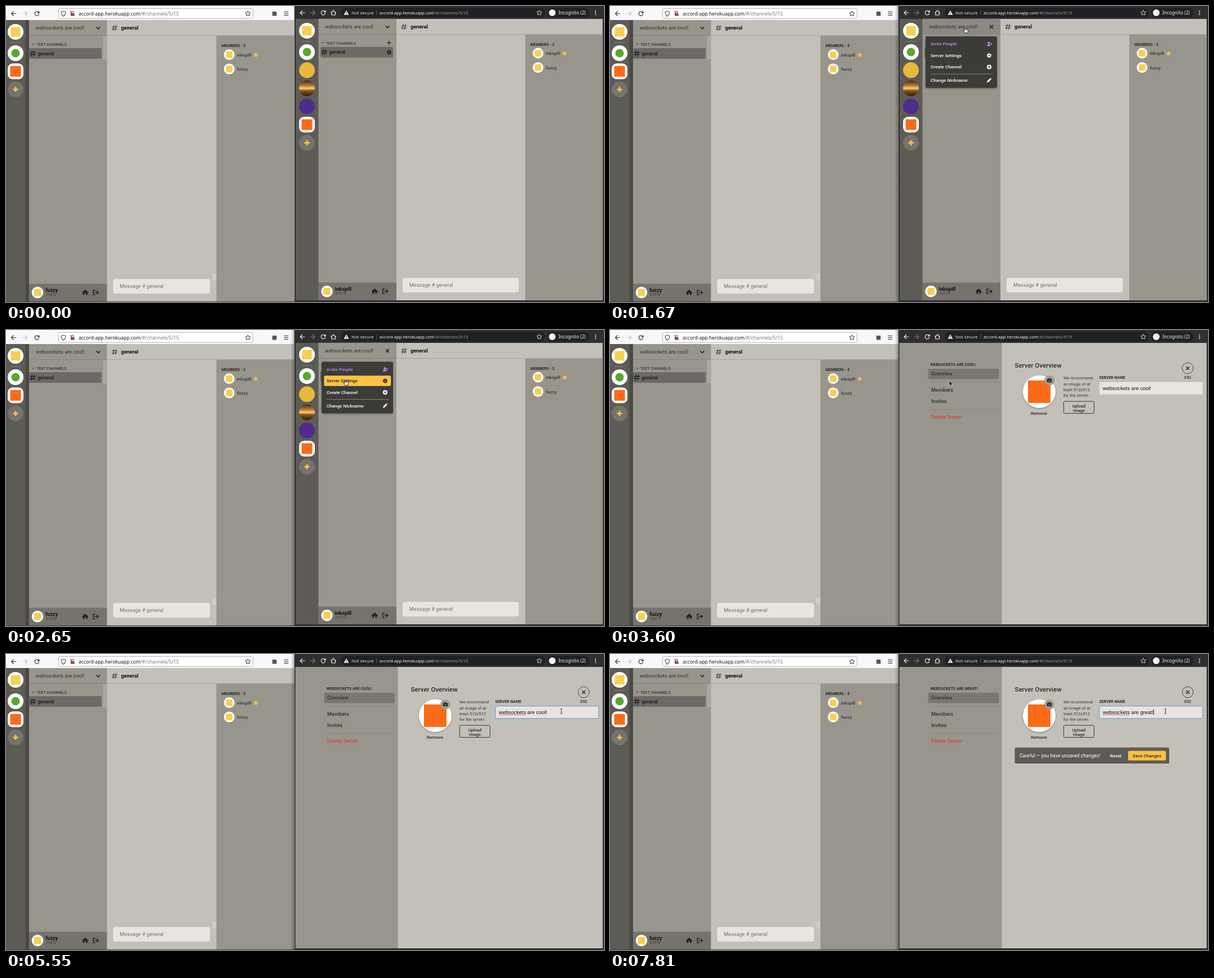
Recreate the animation shown at these times as an HTML page. Size 1063 px wide and 527 px high, loop 8000 ms.

```html
<!DOCTYPE html>
<html lang="en">
<head>
<meta charset="utf-8">
<title>Server settings demo</title>
<style>
  html, body { margin: 0; width: 100%; height: 100%; overflow: hidden; background: #2f2f2e; }
  svg { display: block; width: 1063px; height: 527px; }
  text { font-family: Roboto, sans-serif; white-space: pre; }
  .sys { font-family: "Noto Sans", sans-serif; }
  .field { font-family: "Liberation Sans", Arial, sans-serif; }
</style>
</head>
<body>
<svg id="stage" viewBox="0 0 1063 527" xmlns="http://www.w3.org/2000/svg"></svg>
<script>
const LOOP = 8000;
const C = {
  rail: '#5d5b56', side: '#98958d', main: '#c3c0ba', bar: '#76736d', field: '#e8e5e0',
  ink: '#2b2a28', gold: '#fdc144', orange: '#fb6a17', logo: '#f5cf52', menu: '#3b3a37'
};

const rect = (x, y, w, h, fill, r = 0, more = '') =>
  `<rect x="${x}" y="${y}" width="${w}" height="${h}" rx="${r}" fill="${fill}" ${more}/>`;
const disc = (x, y, r, fill, more = '') => `<circle cx="${x}" cy="${y}" r="${r}" fill="${fill}" ${more}/>`;
const text = (x, y, size, str, { fill = C.ink, w = 400, id = '', cls = '', mid = false } = {}) =>
  `<text x="${x}" y="${y}" font-size="${size}" font-weight="${w}" fill="${fill}" id="${id}" class="${cls}"` +
  `${mid ? ' text-anchor="middle"' : ''}>${str}</text>`;
const line = (x, y, d, color, w = 1.2, more = '') =>
  `<path transform="translate(${x} ${y})" d="${d}" fill="none" stroke="${color}" stroke-width="${w}" ${more}/>`;
const shape = (x, y, d, fill, more = '') => `<path transform="translate(${x} ${y})" d="${d}" fill="${fill}" ${more}/>`;
const group = (id, inner, more = '') => `<g id="${id}" ${more}>${inner}</g>`;

const STAR = 'M0-4.6L1.4-1.6 4.6-1.3 2.2.9 2.9 4.1 0 2.4-2.9 4.1-2.2.9-4.6-1.3-1.4-1.6Z';
const PLUS = 'M-4.5 0H4.5M0-4.5V4.5';
const CROSS = 'M-3-3L3 3M3-3L-3 3';
const HASH = 'M-1.2-5L-2.8 5M2.8-5L1.2 5M-4.5-1.8H5M-5 1.8H4.5';
const BACK = 'M4.3 0H-4M0-4L-4 0 0 4';
const AHEAD = 'M-4.3 0H4M0-4L4 0 0 4';
const RELOAD = 'M3.4-1.7A3.8 3.8 0 1 0 3.7 1M3.9-4V-1.2H1';
const HOME = 'M0-5L6 .3 5.2 1.2 4 .2V4.5H1.2V1.3H-1.2V4.5H-4V.2L-5.2 1.2-6 .3Z';
const EXIT = 'M-1-4H-4.5V4H-1M-2 0H4.5M1.6-3L4.6 0 1.6 3';

const gear = (x, y, fill) =>
  disc(x, y, 2.2, 'none', `stroke="${fill}" stroke-width="1.9"`) +
  disc(x, y, 3.5, 'none', `stroke="${fill}" stroke-width="1.3" stroke-dasharray="1.5 1.25"`);

const logoDisc = (x, y, r) => disc(x, y, r, '#fffefa') + rect(x - r * .6, y - r * .6, r * 1.2, r * 1.2, C.logo);

function rail(x, y, full) {
  const step = 32.3;
  let at = y + 38;
  let out = logoDisc(x, y, 14) + rect(x - 9, y + 18.5, 18, 1, '#85827c') +
    disc(x, at, 14, '#fff') + disc(x, at, 7.5, '#58a82c');
  if (full) {
    out += disc(x, at += step, 14, '#e9b93c') +
      disc(x, at += step, 14, 'url(#dusk)') +
      disc(x, at += step, 14, '#4d2c8c');
  }
  at += step;
  out += rect(x - 14, at - 14, 28, 28, '#fff', 9) + rect(x - 9.5, at - 9.5, 19, 19, C.orange);
  at += step;
  return out + disc(x, at, 14, C.bar) + line(x, at, PLUS, C.gold, 2.8);
}

// Parts both chat windows share; (x, y) is the sidebar's top left corner.
function sidebar(x, y, w, bottom, user, tag) {
  const base = bottom - 16;
  return rect(x, y, w, bottom - y, C.side) +
    rect(x, y + 27, w, 1, '#85827b') +
    line(x + 7.5, y + 43, 'M-2.4-1.2L0 1.2 2.4-1.2', C.ink, .9) +
    text(x + 13, y + 46, 6.9, 'TEXT CHANNELS', { w: 500, fill: '#3b3a37' }) +
    rect(x, bottom - 31.5, w, 31.5, C.bar) +
    logoDisc(x + 15, base, 10.3) +
    text(x + 29, base - 1, 9.2, user, { w: 700, fill: '#111' }) +
    text(x + 29.5, base + 6, 6.9, tag, { fill: '#4a4844' }) +
    shape(x + 99.8, base, HOME, '#222') +
    line(x + 118.8, base, EXIT, '#222', 1.5);
}

function channel(x, y) {
  return rect(x, y, 129, 19, '#6c6a66', 2) +
    line(x + 6.5, y + 9.5, HASH, '#1c1c1b', 1.2, 'transform-origin="0 0" stroke-linecap="round"') +
    text(x + 15.3, y + 12.7, 8.7, 'general', { w: 500, fill: '#1c1c1b' });
}

function chat(x, y, split, right, bottom) {
  return rect(x, y, right - x, bottom - y, C.main) +
    rect(split, y + 27, right - split, bottom - y - 27, C.side) +
    rect(x, y + 27, right - x, 1, '#a8a59f') +
    line(x + 13.5, y + 14, HASH, '#4c4a47', 1.3) +
    text(x + 25, y + 17, 9.2, 'general', { w: 700, fill: '#111' }) +
    rect(x + 11, bottom - 40, split - x - 22.5, 26, C.field, 4) +
    text(x + 22.8, bottom - 23.8, 9.2, 'Message # general', { fill: '#76746f' });
}

function members(x, y) {
  const row = (dy, name) => logoDisc(x + 13.8, y + dy, 9.5) +
    text(x + 27.5, y + dy + 3, 8.05, name, { w: 500, fill: '#3a3936' });
  return text(x, y, 6.9, 'MEMBERS - 2', { w: 700 }) +
    row(13.6, 'inkspill') + row(39, 'fuzzy') + shape(x + 61, y + 13.8, STAR, C.gold);
}

const address = (x, y, size, host, path) =>
  text(x, y, size, `accord-app.herokuapp.com<tspan fill="${path}">/#/channels/5/15</tspan>`, { fill: host, cls: 'sys' });

const leftWindow =
  rect(0, 0, 512.5, 526, '#f8f8fa') +
  line(13.5, 13.5, BACK, '#333') + line(34, 13.5, AHEAD, '#c2c2c6') + line(55, 13.5, RELOAD, '#333') +
  rect(93.5, 4.5, 345.5, 17.5, '#fff', 2.5, 'stroke="#b4b4b8" stroke-width="1"') +
  line(102, 13.5, 'M0-4.5L3.8-3.2C3.8 1.2 2.5 3.5 0 4.8C-2.5 3.5-3.8 1.2-3.8-3.2Z', '#444', 1.1) +
  rect(115, 12.8, 6.4, 4.8, '#55555a', 1) + line(118.2, 12.8, 'M-2 0V-1.5A2 2 0 0 1 2-1.5V0', '#55555a', 1.1) +
  line(118.2, 13.6, 'M-4.2-4.2L4.2 4.2', '#e02950', 1.1) +
  address(129, 16.7, 8.5, '#15141a', '#77777c') +
  line(430, 13.5, STAR, '#333', 1) +
  rect(473.5, 10, 7.5, 7.5, '#55555a') +
  line(498, 13.5, 'M-4-3H4M-4 0H4M-4 3H4', '#333', 1) +
  rect(0, 25, 35, 501, C.rail) + rect(34.7, 25, 6.8, 501, '#4b4945') +
  rail(17, 46, false) +
  sidebar(41, 25, 139, 526, 'fuzzy', '#3852') +
  text(53, 42.2, 9.2, 'websockets are cool!', { fill: '#33322f' }) +
  line(164, 39, 'M-3.5-1.8L0 1.8 3.5-1.8', '#222', 1.6) +
  channel(41, 75) +
  rect(172.5, 53, 7, 42, '#aaa7a0') +
  chat(179.5, 25, 374, 512.5, 526) +
  rect(366.5, 477, 7.5, 12, '#d0cdc8') +
  members(383, 73) +
  rect(0, 526, 513, 1, '#3a3a39');

const toolbar =
  rect(513, 0, 550, 527, '#2f2f30') +
  rect(595, 3, 363, 17.5, '#202124', 8.7) +
  line(527, 12, BACK, '#eee') + line(545, 12, AHEAD, '#77787b') + line(564, 12, RELOAD, '#eee') +
  line(582, 12, 'M-4.5.2L0-4 4.5.2M-3.2-.8V4H3.2V-.8', '#eee') +
  shape(605, 12, 'M0-4.2L4.6 3.8H-4.6Z', '#eee') + rect(604.6, 10.6, .9, 2.6, '#202124') + rect(604.6, 13.8, .9, .9, '#202124') +
  text(614, 14.8, 7.8, 'Not secure', { fill: '#e0e0e2', cls: 'sys' }) +
  rect(658.7, 7, .8, 10, '#66676a') +
  address(664, 14.8, 7.52, '#f2f2f3', '#9a9b9e') +
  line(948, 12, STAR, '#ddd', .9) +
  rect(962, 3, 75, 17.5, '#202124', 8.7) + disc(971, 12, 6, '#f0f0f1') +
  text(982, 15, 8.2, 'Incognito (2)', { fill: '#f0f0f1', cls: 'sys' }) +
  [-3.2, 0, 3.2].map(d => disc(1048, 12 + d, 1, '#eee')).join('');

const rightChat =
  rect(515, 23, 41, 501, C.rail) + rail(535, 44, true) +
  sidebar(555.5, 22.7, 139, 524, 'inkspill', '#2516') +
  rect(555.5, 23, 138.5, 26.7, '#8c8982', 0, 'id="headHover"') +
  text(567, 40, 9.2, 'websockets are cool!', { fill: '#33322f' }) +
  line(678, 37, 'M-3.5-1.8L0 1.8 3.5-1.8', '#222', 1.6, 'id="chevron"') +
  line(678, 37, CROSS, '#222', 1.6, 'id="cross"') +
  line(681, 65.5, 'M-3.5 0H3.5M0-3.5V3.5', '#333', 1.7) +
  channel(559, 72.7) + gear(681, 82.5, '#222') +
  chat(694, 23, 923, 1060.5, 524) + members(932, 70.5);

const ROWS = [
  [70, 'Invite People', '#b58df2', (y, f) => disc(673.3, y - 1.8, 2, f) +
    shape(673.3, y, 'M-3.6 3.6C-3.6-.5 3.6-.5 3.6 3.6Z', f) + line(677.5, y - .5, 'M-1.8 0H1.8M0-1.8V1.8', f, 1)],
  [90.5, 'Server Settings', '#fff', (y, f) => gear(674, y, f)],
  [111, 'Create Channel', '#fff', (y, f) => disc(674, y, 4, f) +
    line(674, y, 'M-2.2 0H2.2M0-2.2V2.2', f === '#fff' ? C.menu : C.gold, 1.1)],
  [134.6, 'Change Nickname', '#fff', (y, f) => shape(674, y, 'M-4 4L-3.3 1.3 1.4-3.4 3.4-1.4-1.3 3.3ZM2-4L2.7-4.5 4.5-2.7 4-2Z', f)]
];
const row = ([y, label, color, icon], on) => {
  const f = on ? '#222' : color;
  return (on ? rect(565.3, y - 9.3, 119, 18.6, C.gold, 2) : '') +
    text(570, y + 2.9, 8.05, label, { w: 500, fill: f }) + icon(y, f);
};
const menu = rect(561, 56.5, 127, 91.7, C.menu, 3, 'filter="url(#soft)"') +
  rect(570, 123, 111, .9, '#8b8984') +
  ROWS.map((r, i) => group('row' + i, row(r, false)) + group('rowOn' + i, row(r, true))).join('');

const tab = (y, label, fill = '#33322f') => text(571, y, 9.2, label, { w: 500, fill });
const hint = ['We recommend', 'an image of at', 'least 512x512', 'for the server.'];
const settings =
  rect(514.5, 23, 546, 501, C.side) + rect(696.5, 23, 364, 501, C.main) +
  text(569.5, 63.5, 6.9, '', { w: 700, id: 'sideName' }) +
  rect(565.5, 69, 125.5, 18.5, '#7a7771', 2) + tab(81.2, 'Overview') +
  rect(568, 92, 123, .8, '#86837c') + tab(109.5, 'Members') + tab(130.3, 'Invites') +
  rect(568, 141, 123, .8, '#86837c') + tab(158.4, 'Delete Server', '#d8433f') +
  text(719.5, 67.3, 11.5, 'Server Overview', { w: 500 }) +
  disc(763, 109.8, 29, '#fff', 'filter="url(#soft)"') + rect(743, 89.8, 40, 40, C.orange) +
  disc(781, 90, 9, '#a09d96') +
  rect(776.8, 87.3, 8.4, 6, '#222', 1) + rect(779, 85.9, 4, 2, '#222', .5) +
  disc(781, 90.3, 1.7, '#222', 'stroke="#a09d96" stroke-width=".8"') +
  text(762.5, 150.8, 8.05, 'Remove', { w: 500, mid: true }) +
  hint.map((s, i) => text(806, 88.3 + i * 10.35, 7.47, s, { fill: '#3a3936' })).join('') +
  rect(806.5, 127, 54, 21.5, 'none', 2, 'stroke="#3a3936" stroke-width="1"') +
  text(833.5, 138, 7.47, 'Upload', { w: 500, mid: true }) + text(833.5, 145.6, 7.47, 'Image', { w: 500, mid: true }) +
  text(869.5, 86.8, 6.9, 'SERVER NAME', { w: 700 }) +
  disc(1027, 68, 9.8, 'none', 'stroke="#3a3936" stroke-width=".9"') + line(1027, 68, CROSS, '#222', 1.4) +
  text(1027.3, 86.8, 6.9, 'ESC', { w: 500, mid: true }) +
  rect(870, 92.8, 183.5, 22, C.field, 1.5, 'id="input"') +
  text(876, 106.7, 9.2, '', { id: 'value', cls: 'field', fill: '#111' }) +
  line(876, 108.6, 'M0 0H48', '#e0483c', .9, 'id="spell" stroke-dasharray="1.4 .5"') +
  rect(0, 98, .9, 10.3, '#111', 0, 'id="caret"') +
  group('notice',
    rect(719.5, 166.5, 274.5, 28.5, C.rail, 2.5) +
    text(728, 184, 8.62, 'Careful — you have unsaved changes!', { fill: '#fff' }) +
    text(889, 184, 8.05, 'Reset', { w: 500, fill: '#fff' }) +
    rect(921, 172.5, 67.3, 17, C.gold, 2) +
    text(954.6, 183.9, 8.05, 'Save Changes', { w: 500, mid: true }));

const pointers =
  group('arrow', shape(0, 0, 'M0 0V9L2.1 7.1 3.5 10.2 5 9.5 3.7 6.5H6.5Z', '#111', 'stroke="#eee" stroke-width=".7"')) +
  group('hand', shape(0, 0, 'M-.9.8C-.9-.3.9-.3.9.8V3.4L4.6 4.2C5.3 4.4 5.5 4.9 5.4 5.6L4.8 9.6H-.2L-2.7 6.3C-3 5.4-2 5-1.5 5.5L-.9 6.1Z',
    '#fff', 'stroke="#111" stroke-width=".9"')) +
  group('beam', line(0, 0, 'M-1.8-4.2H-.6L0-3.8.6-4.2H1.8M0-3.8V3.8M-1.8 4.2H-.6L0 3.8.6 4.2H1.8', '#222', .9));

const stage = document.getElementById('stage');
stage.innerHTML = `<defs>
  <linearGradient id="dusk" x2="0" y2="1">
    <stop offset="0" stop-color="#3b2b1c"/><stop offset=".35" stop-color="#c9812f"/>
    <stop offset=".5" stop-color="#f8cf7c"/><stop offset=".65" stop-color="#8a5420"/><stop offset="1" stop-color="#2c1c10"/>
  </linearGradient>
  <linearGradient id="edge"><stop offset="0" stop-opacity="0"/><stop offset="1" stop-opacity=".28"/></linearGradient>
  <filter id="soft" x="-20%" y="-20%" width="140%" height="140%">
    <feDropShadow dx="0" dy="1" stdDeviation="1.6" flood-opacity=".4"/></filter>
  </defs>` + leftWindow + rect(506, 0, 7, 527, 'url(#edge)', 0, 'id="shade"') + toolbar +
  group('chat', rightChat) + group('menu', menu) + group('settings', settings) + group('pointer', pointers);

const $ = id => document.getElementById(id);
const show = (id, on) => $(id).setAttribute('display', on ? 'inline' : 'none');

// start, end, number of steps, from, to
const MOVES = [
  [830, 1220, 5, [915, 195], [606, 46]],
  [1320, 1420, 2, [606, 46], [631, 38.3]],
  [2270, 2650, 5, [631, 38.3], [603, 88.8]],
  [3650, 4400, 9, [603, 90.3], [962, 104]],
  [4500, 4980, 6, [962, 104], [987.3, 101.8]]
];
const ENDINGS = [
  [0, 'cool!'], [5860, 'cool'], [6040, 'coo'], [6140, 'co'], [6340, 'c'], [6630, ''],
  [7040, 'g'], [7220, 'gre'], [7420, 'grea'], [7510, 'great'], [7810, 'great!']
];

const last = (list, t) => list.filter(e => t >= e[0]).pop();

function pointerAt(t) {
  const [start, end, n, from, to] = last(MOVES, t);
  const k = Math.min(n, Math.floor((t - start) / ((end - start) / (n - 1)) + 1e-6) + 1) / n;
  const p = k * k * (3 - 2 * k);
  return from.map((v, i) => v + (to[i] - v) * p);
}

function draw(t) {
  const inSettings = t >= 3600, menuOpen = t >= 1580 && !inSettings;
  const focused = t >= 5060;
  const moving = t >= 830;
  const [x, y] = t >= 3600 && t < 3650 ? [603, 90.3] : moving ? pointerAt(t) : [0, 0];
  const onHead = moving && !inSettings && x > 556 && x < 694 && y < 50;
  const hover = menuOpen ? ROWS.findIndex(r => x > 565 && x < 685 && Math.abs(y - r[0]) < 9.5) : -1;

  show('shade', t >= 1580);
  show('chat', !inSettings);
  show('settings', inSettings);
  show('headHover', onHead);
  show('chevron', !menuOpen);
  show('cross', menuOpen);
  show('menu', menuOpen);
  $('menu').setAttribute('transform', `translate(0 ${t < 1670 ? -5 : t < 1770 ? -2.4 : 0})`);
  $('menu').setAttribute('opacity', t < 1670 ? .7 : 1);
  ROWS.forEach((r, i) => { show('row' + i, i !== hover); show('rowOn' + i, i === hover); });

  const kind = inSettings ? (x >= 870 ? 'beam' : 'arrow') : onHead || hover >= 0 ? 'hand' : 'arrow';
  show('pointer', moving);
  ['arrow', 'hand', 'beam'].forEach(k => show(k, k === kind));
  $('pointer').setAttribute('transform', `translate(${x} ${y})`);

  if (!inSettings) return;
  const [since, ending] = last(ENDINGS, t);
  const name = 'websockets are ' + ending;
  $('value').textContent = name;
  $('sideName').textContent = name.toUpperCase();
  $('input').setAttribute('stroke', focused ? '#5b9bd5' : '#d6d3cd');
  $('input').setAttribute('stroke-width', focused ? 1 : .6);
  show('spell', focused);
  show('caret', focused && (since ? (t - since) % 1000 < 500 : t < 5550));
  $('caret').setAttribute('x', 876 + $('value').getComputedTextLength());
  show('notice', t >= 5860);
  $('notice').setAttribute('transform', `translate(0 ${t < 5950 ? 7 : 0})`);
}

const begin = performance.now();
function tick() {
  draw((performance.now() - begin) % LOOP);
  requestAnimationFrame(tick);
}
tick();
</script>
</body>
</html>
```
